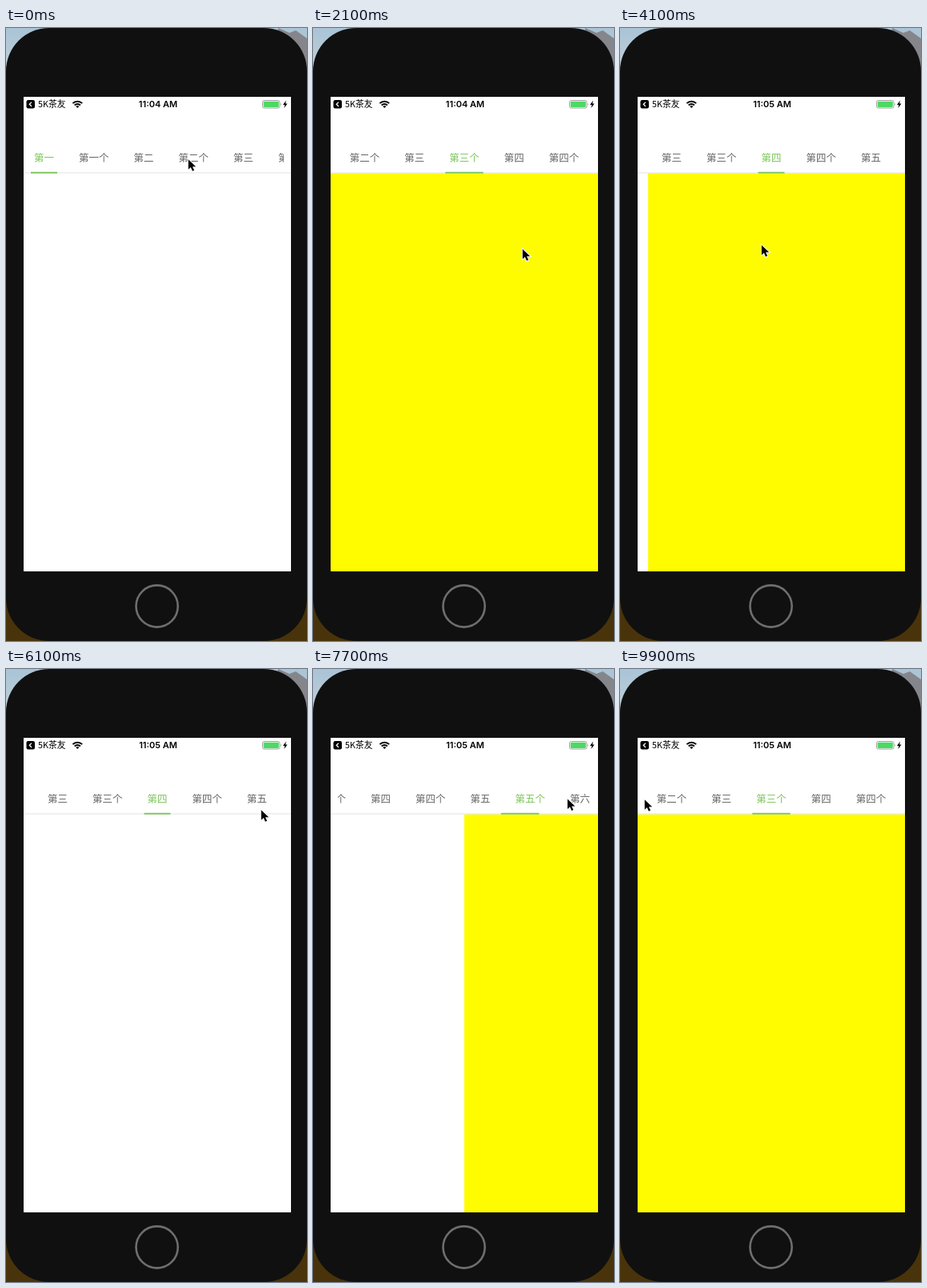
Animation, 376 px wide and 766 px high, one loop 10000 ms. Source, as an HTML page:

```html
<!DOCTYPE html>
<html lang="zh">
<head>
<meta charset="utf-8">
<title>Tab pager</title>
<style>
  html, body { margin: 0; width: 100%; height: 100%; overflow: hidden; background: #111; }
  svg { display: block; width: 376px; height: 766px; }
  text { font-family: "Noto Sans CJK SC", "Noto Sans CJK", sans-serif; }
  #tabs text { font-size: 12.5px; fill: #666; text-anchor: middle; }
  #tabs text.on { fill: #7cc65b; }
  #clock { font: 600 11px Inter, sans-serif; text-anchor: middle; }
</style>
</head>
<body>
<svg viewBox="0 0 376 766">
  <defs>
    <linearGradient id="sky" x2="0" y2="1">
      <stop offset="0" stop-color="#a9c4d6"/><stop offset="1" stop-color="#c3d0d8"/>
    </linearGradient>
    <clipPath id="screen"><rect x="22" y="86" width="334" height="593"/></clipPath>
    <clipPath id="strip"><rect x="31" y="140" width="316" height="45"/></clipPath>
  </defs>

  <rect width="376" height="60" fill="url(#sky)"/>
  <path d="M340 0l14 6 8-3 14 10v50h-36z" fill="#85868c"/>
  <rect y="700" width="376" height="66" fill="#49330a"/>
  <rect width="376" height="766" rx="54" fill="#101010"/>
  <circle cx="188.6" cy="722.5" r="26.1" fill="none" stroke="#6e6e6e" stroke-width="2.6"/>

  <g clip-path="url(#screen)">
    <rect x="22" y="86" width="334" height="593" fill="#fff"/>
    <g id="pages"></g>
    <rect x="22" y="180.5" width="334" height="1" fill="#e4e4e4"/>
    <g clip-path="url(#strip)">
      <g id="tabs"><rect id="line" y="179.8" height="1.9" fill="#7cc65b"/></g>
    </g>

    <rect x="25.5" y="90" width="10.5" height="10.5" rx="2.2"/>
    <path d="M32 92.6l-2.7 2.7 2.7 2.7" fill="none" stroke="#fff" stroke-width="1.3"/>
    <text x="40" y="99.2" font-size="10.8">5K茶友</text>
    <path d="M83.4 94.2a8.3 8.3 0 0 1 11.8 0M85.7 96.5a5 5 0 0 1 7.2 0" fill="none" stroke="#000" stroke-width="1.9"/>
    <path d="M89.3 100l-2-2.1a2.9 2.9 0 0 1 4 0z"/>
    <text id="clock" x="190" y="99.2"></text>
    <rect x="320.5" y="90.5" width="21.5" height="9.6" rx="2.2" fill="#fff" stroke="#999" stroke-width=".9"/>
    <rect x="321.7" y="91.7" width="19.1" height="7.2" rx="1.1" fill="#4cd964"/>
    <path d="M343 93.7q1.6 1.6 0 3.2z" fill="#999"/>
    <path d="M350 90.6l-4 5.4h2.3l-.9 4 4.1-5.6h-2.4z"/>
  </g>

  <path id="cursor" d="M.8 1.2v12.6l3-2.8 2.1 4.8 2.2-1-2.1-4.6h4.2z" stroke="#fff" stroke-width="1.8" paint-order="stroke"/>
</svg>

<script>
const LOOP = 10000, STEP = 100, PAGE_W = 334, PAIR = 124.5, MID = 189, MAX_SCROLL = 336.5;
const SLIDE = 300, DRAG_TIME = 200, DRAG = 150;
const $ = id => document.getElementById(id);
const clamp = (v, a, b) => Math.min(b, Math.max(a, v));
const mix = (a, b, k) => a + (b - a) * k;
const smooth = u => (u = clamp(u, 0, 1), u * u * (3 - 2 * u));
const easeOut = u => 1 - (1 - clamp(u, 0, 1)) ** 3;

function add(name, parent, attrs) {
  const el = document.createElementNS('http://www.w3.org/2000/svg', name);
  for (const k in attrs) el.setAttribute(k, attrs[k]);
  return parent.appendChild(el);
}

const tabs = [];
for (let i = 0; i < 11; i++) {
  const odd = i % 2, width = odd ? 47.5 : 33;
  const mid = (odd ? 86 : 31) + PAIR * (i >> 1) + width / 2;
  const label = add('text', $('tabs'), { x: mid, y: 167.2 });
  label.textContent = '第' + '一二三四五六'[i >> 1] + (odd ? '个' : '');
  add('rect', $('pages'), { x: 22 + i * PAGE_W, y: 181.5, width: PAGE_W, height: 498, fill: odd ? '#fffc00' : '#fff' });
  tabs.push({ width, mid, label, scroll: clamp(mid - MID, 0, MAX_SCROLL) });
}

// The whole story: the pointer goes to x, y and opens a tab at a given time.
const gestures = [];
const tap = (at, to, x, y, swipe = false) => {
  const from = gestures.length ? gestures.at(-1).to : 0;
  gestures.push({ at, from, to, x, y, swipe, endX: x + (swipe ? DRAG * (from - to) : 0) });
};
const swipe = (at, to, x, y) => tap(at, to, x, y, true);

tap(0, 3, 227, 163);
tap(1369, 5, 293, 165);
swipe(2300, 6, 261, 275);
swipe(3902, 7, 326, 270);
swipe(5000, 6, 110, 278);
tap(6350, 8, 318, 175);
tap(7550, 9, 290, 160);
tap(7890, 10, 333, 162);
tap(9560, 5, 30, 162);

function pointer(t) {
  const i = gestures.findLastIndex(g => t >= g.at), now = gestures[i], next = gestures[i + 1];
  const dragged = mix(now.x, now.endX, smooth((t - now.at) / DRAG_TIME));
  if (!next) return [dragged, now.y];
  // longer trips take longer, with a short rest before acting
  const arrive = next.at - Math.min(250, (next.at - now.at) / 4);
  const trip = 400 + 1.7 * Math.hypot(next.x - now.endX, next.y - now.y);
  const leave = Math.max(now.at + (now.swipe ? DRAG_TIME : 0), arrive - trip);
  const k = smooth((t - leave) / (arrive - leave));
  return [mix(dragged, next.x, k), mix(now.y, next.y, k)];
}

function draw(t) {
  let page = 0, sel = 0, scroll = 0, line = tabs[0].mid;
  for (const { at, from, to, swipe } of gestures) {
    if (t <= at) break;
    const a = tabs[from], b = tabs[to];
    page = mix(from, to, (swipe ? easeOut : smooth)((t - at) / SLIDE));
    // a swipe updates the tab strip only once the page has settled
    const dt = t - at - (swipe ? SLIDE : 0);
    if (dt < 0) continue;
    sel = to;
    scroll = mix(a.scroll, b.scroll, smooth(dt / SLIDE));
    line = mix(a.mid, b.mid, smooth((dt - 10) / 197));
  }
  const w = tabs[sel].width;
  $('pages').setAttribute('transform', `translate(${-page * PAGE_W})`);
  $('tabs').setAttribute('transform', `translate(${-scroll})`);
  $('line').setAttribute('x', line - w / 2);
  $('line').setAttribute('width', w);
  tabs.forEach((tab, i) => tab.label.setAttribute('class', i === sel ? 'on' : ''));
  $('clock').textContent = t < 3500 ? '11:04 AM' : '11:05 AM';
  $('cursor').setAttribute('transform', `translate(${pointer(t)})`);
}

const origin = performance.now();
function tick() {
  const t = Math.max(0, performance.now() - origin) % LOOP;
  draw(Math.floor(t / STEP) * STEP);
  requestAnimationFrame(tick);
}
tick();
</script>
</body>
</html>
```
